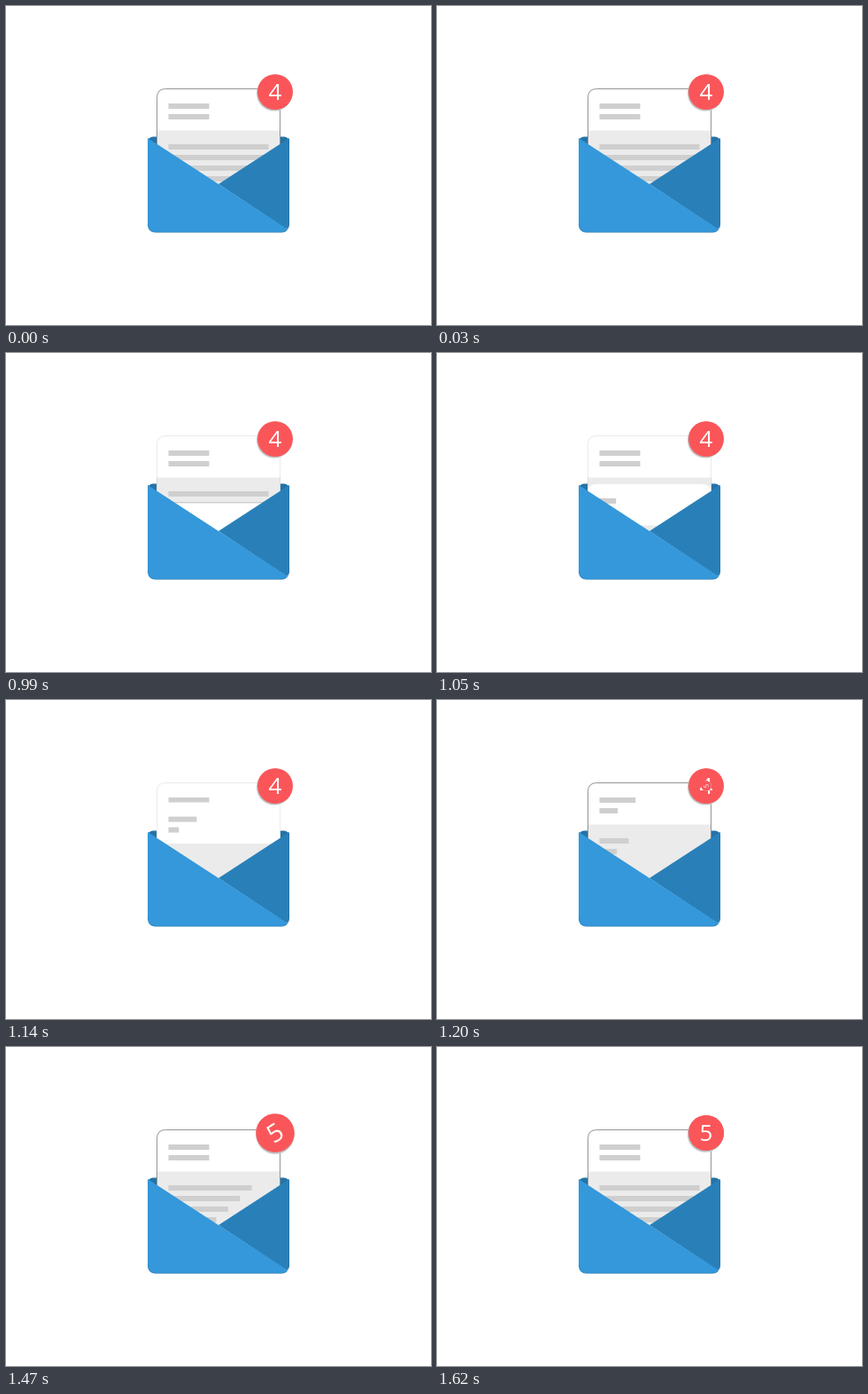
Write an HTML page that moves like this. It is 480 by 360 pixels and loops after 2700 ms.

```html
<!DOCTYPE html>
<html lang="en">
<head>
<meta charset="utf-8">
<title>Inbox counter</title>
<style>
  html, body { margin: 0; width: 100%; height: 100%; overflow: hidden; background: #fff; }
  svg { display: block; width: 100vw; height: 100vh; }
  text { font: 26px "Open Sans", "Noto Sans", sans-serif; fill: #fff; text-anchor: middle; }
</style>
</head>
<body>
<svg viewBox="0 0 480 360">
  <defs>
    <clipPath id="pocket"><rect x="160" y="80" width="160" height="168"/></clipPath>
  </defs>
  <rect x="160" y="147.5" width="160" height="100" rx="6" fill="#2573a7"/>
  <g clip-path="url(#pocket)">
    <g id="oldPaper"></g>
    <g id="newPaper"></g>
  </g>
  <path id="outline" d="M170.5 156V103.500Q170.500 93.500 180.500 93.500H299.500Q309.500 93.500 309.500 103.500V156"
        fill="none" stroke="#747b80" stroke-width=".8"/>
  <path d="M320 149L240 201L317 252Q320 250 320 246Z" fill="#2980b9"/>
  <path d="M160 149L240 201L318 252Q316 255.500 311 255.500H169Q160 255.500 160 246.500Z" fill="#3498db"/>
  <path d="M160.500 246Q160.500 255.300 169 255.300H311Q319.600 255.300 319.600 246V151"
        fill="none" stroke="#1f5f8f" stroke-opacity=".55" stroke-width=".7"/>
  <g id="oldBadge"></g>
  <g id="newBadge"></g>
</svg>
<script>
const LOOP = 2700, STEP = 30;
const PAPER_IN = 930, PAPER_REST = 1200, PAPER_SPEED = 0.36;
const BADGE_IN = 1170, BADGE_TIME = 450;

// Text bars: top edge, full width, and when each one grows
const bars = [
  { y: 110, width: 46, start: 923, time: 312 },
  { y: 122, width: 46, start: 1060, time: 312 },
  ...[0, 1, 2, 3].map(i => ({ y: 156 + 12 * i, width: 113, start: 1054 + 59 * i, time: 500 }))
];

const byId = id => document.getElementById(id);
const clamp = v => Math.max(0, Math.min(1, v));
const easeOutBack = p => 1 + 2.70158 * (p - 1) ** 3 + 1.70158 * (p - 1) ** 2;

const paper = () =>
  `<path d="M170 260V104Q170 94 180 94H300Q310 94 310 104V260Z" fill="#fff"/>
   <rect x="170" y="140.500" width="140" height="120" fill="#ebebeb"/>` +
  bars.map(b => `<rect class="bar" x="183.500" y="${b.y}" width="${b.width}" height="6" fill="#cfcfcf"/>`).join("");

const badge = digit =>
  `<circle cx="-1" cy="1.500" r="20" fill="#bfc3c4"/>
   <circle r="20" fill="#fa5659"/>
   <text y="9">${digit}</text>`;

byId("oldPaper").innerHTML = paper();
byId("newPaper").innerHTML = paper();
byId("oldBadge").innerHTML = badge(4);
byId("newBadge").innerHTML = badge(5);
byId("oldBadge").setAttribute("transform", "translate(304 97)");
const newBars = byId("newPaper").querySelectorAll(".bar");

function draw(t) {
  const drop = Math.max(0, (PAPER_REST - t) * PAPER_SPEED);
  byId("newPaper").style.display = t < PAPER_IN ? "none" : "";
  byId("newPaper").setAttribute("transform", `translate(0 ${drop})`);
  bars.forEach((b, i) =>
    newBars[i].setAttribute("width", b.width * clamp((t - b.start) / b.time)));
  byId("outline").style.opacity = t > PAPER_IN && t < PAPER_REST ? 0.2 : 1;

  const grow = easeOutBack(clamp((t - BADGE_IN) / BADGE_TIME));
  byId("newBadge").style.display = t <= BADGE_IN ? "none" : "";
  byId("newBadge").setAttribute("transform",
    `translate(304 97) rotate(${360 * (1 - grow)}) scale(${grow})`);
}

const began = performance.now();
function tick() {
  const t = (performance.now() - began) % LOOP;
  draw(Math.floor(t / STEP) * STEP);
  requestAnimationFrame(tick);
}
tick();
</script>
</body>
</html>
```
